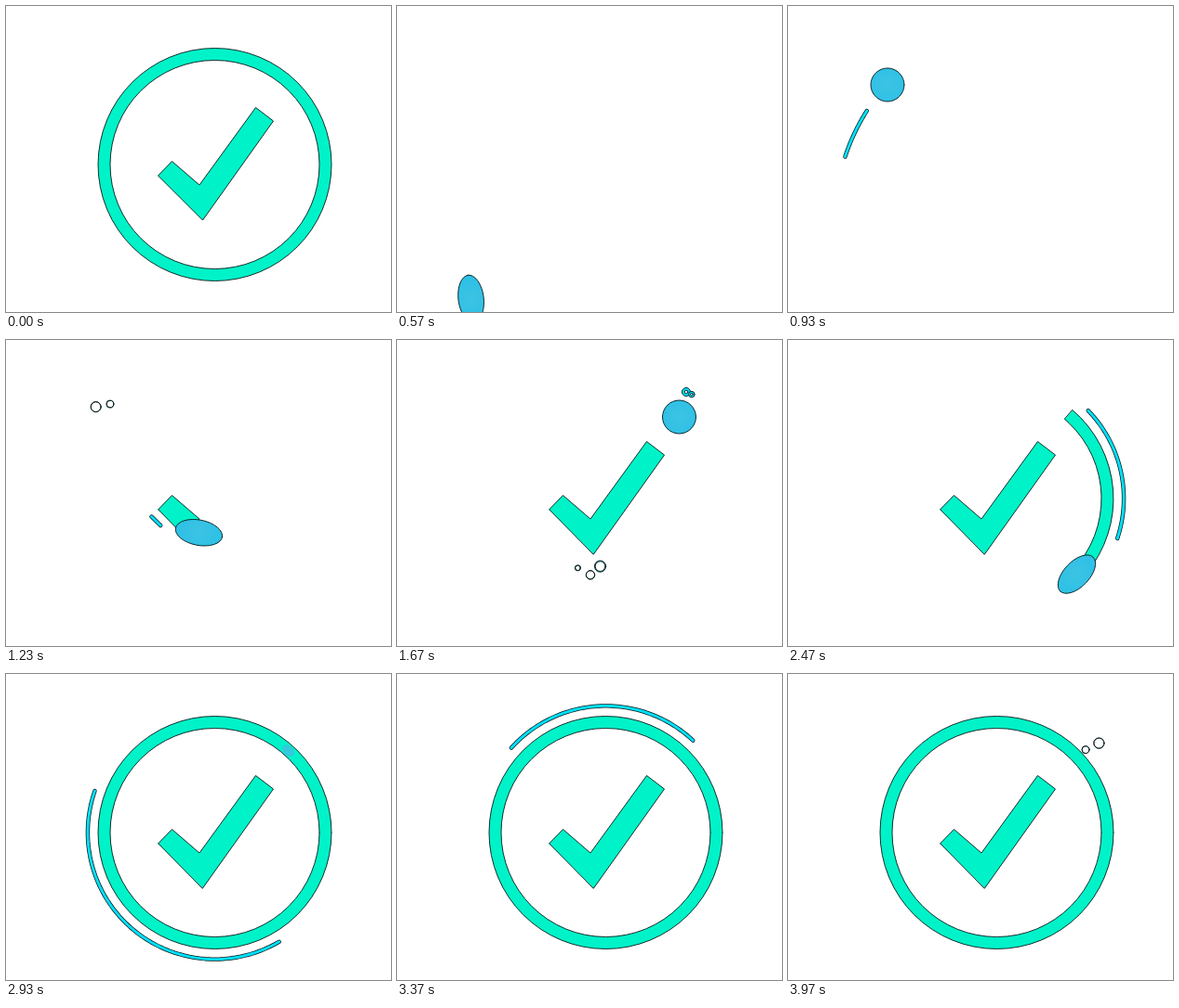
These frames come from a looping animation (414 by 330 pixels, 4.01 s). An HTML page with a canvas:

```html
<!DOCTYPE html>
<html lang="en">
<head>
<meta charset="utf-8">
<title>Check mark</title>
<style>
  html, body { margin: 0; width: 100%; height: 100%; overflow: hidden; background: #fff; }
  canvas { display: block; width: 414px; height: 330px; }
</style>
</head>
<body>
<canvas id="stage" width="414" height="330"></canvas>
<script>
const ctx = document.getElementById('stage').getContext('2d');
const LOOP = 4010, RESET = 497;
const TEAL = '#00f3c8', CYAN = '#00e1fb', BLUE = '#30c1e6', INK = '#04191a';
const CX = 224.5, CY = 171, OUTER = 125.5, INNER = 112.5;
const TAU = 2 * Math.PI, RAD = Math.PI / 180;

const mix = (a, b, u) => a + (b - a) * u;
const mixPt = (p, q, u) => [mix(p[0], q[0], u), mix(p[1], q[1], u)];
const dist = (p, q) => Math.hypot(q[0] - p[0], q[1] - p[1]);
const toward = (p, q, d) => mixPt(p, q, Math.min(1, Math.max(0, d / dist(p, q))));
const polar = (x, y, r, deg) => [x + r * Math.cos(deg * RAD), y + r * Math.sin(deg * RAD)];

// Ease in and out: n sets the steepness, warp below 1 hurries the start.
function ease(t, start, end, n = 1.5, warp = 1) {
  const u = Math.min(1, Math.max(0, (t - start) / (end - start))) ** warp;
  return u ** n / (u ** n + (1 - u) ** n);
}

// The ball rises in an arc, follows the check, then circles the ring.
const rest = [107, 85], tip = [171, 175], corner = [210, 210], exit = [303.5, 83];
const toTip = dist(rest, tip), arm = dist(tip, corner);
const routeLength = toTip + arm + dist(corner, exit);

const travel = t => routeLength * ease(t, 990, 1600, 1.5, 0.75);
const ringAngle = t => mix(-48, 312, ease(t, 2273, 2933, 1.27));

function ballAt(t) {
  if (t < 990) {
    const u = ease(t, 500, 880), bend = [58, 190];
    return mixPt(mixPt([84, 346], bend, u), mixPt(bend, rest, u), u);
  }
  if (t > 2110) return polar(CX, CY, 118.5, ringAngle(t));
  const s = travel(t);
  if (s < toTip) return toward(rest, tip, s);
  return s < toTip + arm ? toward(tip, corner, s - toTip) : toward(corner, exit, s - toTip - arm);
}

function paint(fill) {
  ctx.fillStyle = fill;
  ctx.fill('evenodd');
  ctx.strokeStyle = INK;
  ctx.lineWidth = 0.9;
  ctx.stroke();
}

// The check is a mitred stroke, cut square at distance s from its tip.
function drawCheck(s) {
  if (s <= 0) return;
  const A = [163.5, 183], B = [178.5, 167.5], C = [208, 193];
  const D = [268.5, 109.5], E = [287.5, 124], F = [211.5, 231];
  const miter = 14, d = s - arm;
  const shape = d < 0
    ? [A, B, toward(B, C, s), toward(A, F, s)]
    : [A, B, C, toward(C, D, d - miter), toward(F, E, d + miter), F];
  ctx.beginPath();
  shape.forEach(p => ctx.lineTo(...p));
  ctx.closePath();
  paint(TEAL);
}

function annulus(x, y, r, hole, fill) {
  ctx.beginPath();
  ctx.arc(x, y, r, 0, TAU);
  ctx.moveTo(x + hole, y);
  ctx.arc(x, y, hole, 0, TAU);
  paint(fill);
}

function drawRing(angle) {
  if (angle > 310) return annulus(CX, CY, OUTER, INNER, TEAL);
  if (angle < -47) return;
  ctx.beginPath();
  ctx.arc(CX, CY, OUTER, -49.5 * RAD, angle * RAD);
  ctx.arc(CX, CY, INNER, angle * RAD, -49.5 * RAD, true);
  ctx.closePath();
  paint(TEAL);
}

function drawTrail(point, tail, head) {
  if (head - tail < 0.005) return;
  ctx.beginPath();
  for (let i = 0; i <= 60; i++) ctx.lineTo(...point(mix(tail, head, i / 60)));
  ctx.lineCap = ctx.lineJoin = 'round';
  for (const [color, width] of [[INK, 4.4], [CYAN, 2.9]]) {
    ctx.strokeStyle = color;
    ctx.lineWidth = width;
    ctx.stroke();
  }
}

function drawTrails(t) {
  drawTrail(u => polar(270.5, 231, 220, mix(150, 220, u)), ease(t, 640, 1103), ease(t, 540, 1027));
  drawTrail(u => mixPt([156, 190], [204, 237], u), ease(t, 1220, 1470), ease(t, 1160, 1400));
  drawTrail(u => polar(CX, CY, 136.6, mix(-44, 316, u)),
    ease(t, 2565, 3710, 1.2), ease(t, 2137, 3418));
}

// Bubbles fan out around a heading, and hollow out until they are gone.
function burst(t, start, life, x, y, heading, count) {
  for (let i = 0; i < count; i++) {
    const k = i - (count - 1) / 2;
    const u = (t - start) / (life * (1 + Math.abs(k) / 4));
    if (u <= 0 || u >= 1) continue;
    const e = 1 - (1 - u) ** 2, r = (4.8 - 1.6 * k) * (0.7 + 0.3 * e);
    annulus(...polar(x, y, (16 + 2 * k) * e, heading + 60 * k), r, r * e, CYAN);
  }
}

function drawBubbles(t) {
  burst(t, 1000, 250, 105, 84, -95, 2);
  burst(t, 1400, 340, 208, 238, 90, 3);
  burst(t, 1570, 400, 311, 62, -60, 2);
  burst(t, 3540, 410, 323, 65, 70, 2);
}

// The ball stretches along its motion.
function drawBall(t) {
  const scale = 1 - ease(t, 2840, 2990);
  if (scale < 0.01) return;
  const [x, y] = ballAt(t), before = ballAt(t - 17), after = ballAt(t + 17);
  const speed = dist(before, after) / 34;
  const k = Math.min(1, speed / 0.5), r = 18 * scale;
  ctx.save();
  ctx.globalAlpha = 0.45 + 0.55 * scale;
  ctx.beginPath();
  ctx.ellipse(x, y, r * (1 + 0.42 * k), r * (1 - 0.24 * k),
    Math.atan2(after[1] - before[1], after[0] - before[0]), 0, TAU);
  if (scale > 0.7) {
    const glow = ctx.createRadialGradient(x, y, 0, x, y, 18);
    glow.addColorStop(0, '#3dc3e2');
    glow.addColorStop(1, BLUE);
    paint(glow);
  } else {
    ctx.fillStyle = '#4fb4e6';
    ctx.fill();
  }
  ctx.restore();
}

function draw(t) {
  ctx.fillStyle = '#fff';
  ctx.fillRect(0, 0, 414, 330);
  if (t < RESET) {
    drawRing(360);
    drawCheck(routeLength);
    return;
  }
  drawTrails(t);
  drawRing(ringAngle(t));
  drawCheck(travel(t) - toTip);
  drawBubbles(t);
  drawBall(t);
}

const begin = performance.now();
function tick() {
  draw((performance.now() - begin) % LOOP);
  requestAnimationFrame(tick);
}
tick();
</script>
</body>
</html>
```
